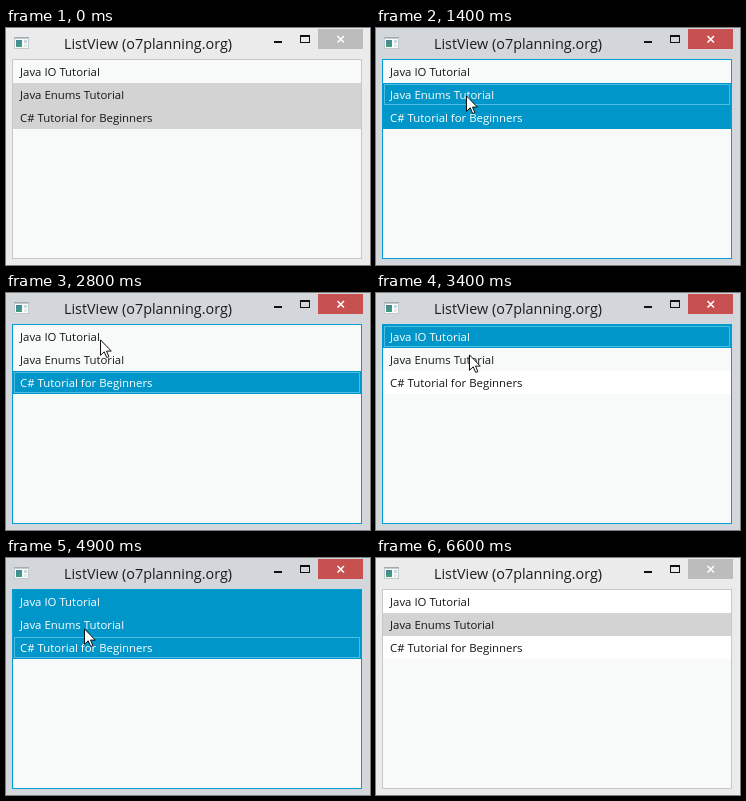
An HTML page for the animation above (6.8 s loop, 364 px wide and 237 px high).

```html
<!DOCTYPE html>
<html lang="en">
<head>
<meta charset="utf-8">
<title>ListView</title>
<style>
  html, body { margin: 0; width: 100%; height: 100%; overflow: hidden; }
  svg { display: block; width: 364px; height: 237px; font-family: "Open Sans", "Noto Sans", sans-serif; }
  .frame { fill: #ebebeb; }
  .border { fill: #c8c8c8; }
  .close { fill: #bcbcbc; }
  .title { font-size: 14.4px; fill: #1c1c1c; }
  .row text { font-size: 11.4px; fill: #161616; }
  .row .bar { fill: #fff; }
  .row:nth-child(even) .bar, .row.fresh .bar { fill: #f8faf9; }
  .row .ring { fill: none; stroke: none; }
  .row.selected .bar { fill: #d3d3d3; }

  .active .frame { fill: #d3d7db; }
  .active .border { fill: #039ed3; }
  .active .close { fill: #c75050; }
  .active .row.selected .bar { fill: #0096c9; }
  .active .row.selected text { fill: #fff; }
  .active .row.focused .ring { stroke: #4ebde4; }
</style>
</head>
<body>
<svg id="window" viewBox="0 0 364 237">
  <defs>
    <linearGradient id="teal" x2="0.4" y2="1">
      <stop offset="0" stop-color="#4a7fa0"/>
      <stop offset="1" stop-color="#3fa07c"/>
    </linearGradient>
  </defs>
  <rect class="frame" width="364" height="237"/>

  <g id="icon" shape-rendering="crispEdges">
    <rect x="8" y="9" width="15" height="12" fill="#c3c8cc"/>
    <rect x="8" y="9" width="15" height="1" fill="#a4abb0"/>
    <rect x="9" y="11" width="13" height="9" fill="#fafbfb"/>
    <rect x="10" y="12" width="6" height="7" fill="url(#teal)"/>
    <rect x="18" y="12" width="3" height="3" fill="#c5d8dc"/>
    <rect x="18" y="16" width="3" height="3" fill="#e2e7e8"/>
  </g>
  <text class="title" x="58" y="21">ListView (o7planning.org)</text>

  <g shape-rendering="crispEdges">
    <rect x="268" y="13" width="8" height="2" fill="#111"/>
    <path d="M294 7h10v8h-10zM295 9v5h8v-5z" fill="#111" fill-rule="evenodd"/>
    <rect class="close" x="312" y="1" width="45" height="20"/>
  </g>
  <path d="M331.500 8l6.500 6.500M338 8l-6.500 6.500" stroke="#fff" stroke-width="1.600"/>

  <rect class="border" x="6" y="31" width="350" height="200"/>
  <rect x="7" y="32" width="348" height="198" fill="#f8faf9"/>

  <g id="rows">
    <g class="row" transform="translate(7 32)">
      <rect class="bar" width="348" height="23"/>
      <rect class="ring" x="1.500" y="1.500" width="345" height="20"/>
      <text x="7" y="16">Java IO Tutorial</text>
    </g>
    <g class="row" transform="translate(7 55)">
      <rect class="bar" width="348" height="23"/>
      <rect class="ring" x="1.500" y="1.500" width="345" height="20"/>
      <text x="7" y="16">Java Enums Tutorial</text>
    </g>
    <g class="row" transform="translate(7 78)">
      <rect class="bar" width="348" height="23"/>
      <rect class="ring" x="1.500" y="1.500" width="345" height="20"/>
      <text x="7" y="16">C# Tutorial for Beginners</text>
    </g>
  </g>

  <path id="cursor" visibility="hidden" fill="#fff" stroke="#111"
    d="M.5 .9V16.300L4.200 12.800 6.700 18.500 8.900 17.600 6.500 12.100H11.300Z"/>
</svg>
<script>
const LOOP = 6800, TICK = 100;
const SHOW = 800, HIDE = 6200;

// time, x, y of the pointer tip
const path = [
  [800, 271, 56], [1200, 90, 67], [1700, 90, 67], [2200, 96, 83],
  [2300, 96, 83], [2800, 94, 46], [3000, 94, 46], [3500, 93, 65],
  [3900, 93, 65], [4100, 100, 86], [4400, 100, 86], [5000, 74, 67],
  [5400, 53, 62], [5700, 53, 62], [6100, 347, 52], [6200, 347, 52]
];

// time, window active, selected rows, focused row
const states = [
  [0, false, [1, 2], 1],
  [1400, true, [1, 2], 1],
  [1600, true, [1], 1],
  [2300, true, [2], 2],
  [2900, true, [0], 0],
  [3700, true, [0, 1], 1],
  [4400, true, [0, 1, 2], 2],
  [5600, true, [1], 1],
  [6600, false, [1], 1]
];

const win = document.getElementById("window");
const cursor = document.getElementById("cursor");
const rows = [...document.querySelectorAll(".row")];

function pointerAt(t) {
  const i = path.findIndex(p => p[0] > t);
  const [t0, x0, y0] = path[i - 1], [t1, x1, y1] = path[i];
  const k = (t - t0) / (t1 - t0);
  return [Math.round(x0 + (x1 - x0) * k), Math.round(y0 + (y1 - y0) * k)];
}

function draw(t) {
  const past = states.filter(s => s[0] <= t);
  const [, active, selected, focus] = past.at(-1);
  win.classList.toggle("active", active);
  rows.forEach((row, i) => {
    row.classList.toggle("selected", selected.includes(i));
    row.classList.toggle("focused", i === focus);
    // rows keep the list's tint until they are first selected
    row.classList.toggle("fresh", !past.some(s => s[2].includes(i)));
  });

  const visible = t >= SHOW && t < HIDE;
  cursor.setAttribute("visibility", visible ? "visible" : "hidden");
  if (visible) cursor.setAttribute("transform", `translate(${pointerAt(t)})`);
}

const start = performance.now();
function frame() {
  const t = (performance.now() - start) % LOOP;
  draw(Math.floor(t / TICK) * TICK);
  requestAnimationFrame(frame);
}
frame();
</script>
</body>
</html>
```
